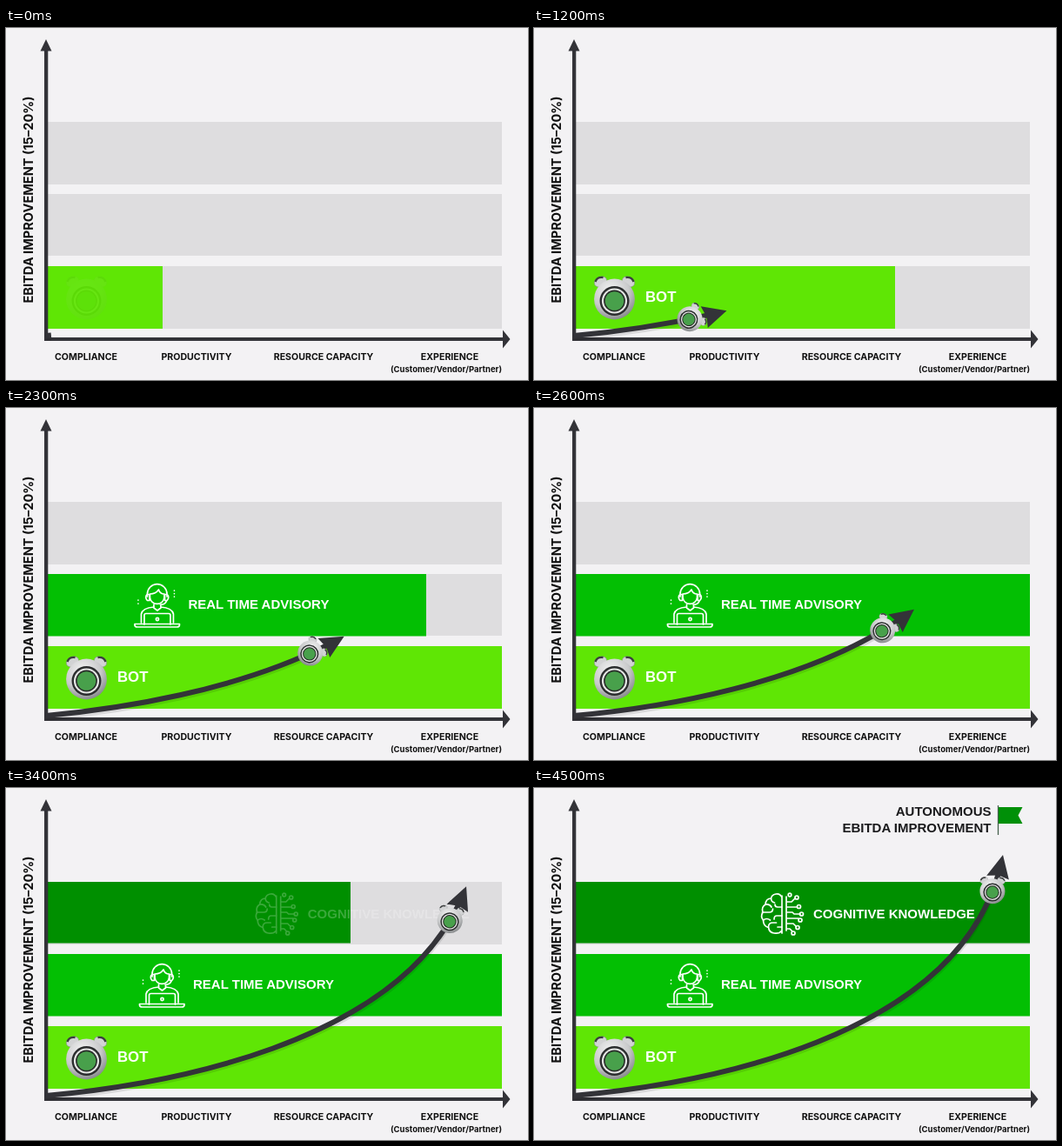
Animation, 600 px wide and 405 px high, one loop 8 s. Source, as an HTML page:

```html
<!DOCTYPE html>
<html lang="en">
<head>
<meta charset="utf-8">
<title>EBITDA improvement chart</title>
<style>
  html, body { margin: 0; width: 100%; height: 100%; overflow: hidden; background: #f3f2f4; }
  svg { display: block; width: 100%; height: 100%; }
  .axis { font: 700 10.6px Inter, "Open Sans", sans-serif; fill: #111; text-anchor: middle; }
  .label { font: 700 15px "Liberation Sans", Arial, sans-serif; fill: #fff; }
  .line { fill: none; stroke: #fff; stroke-width: 1.7; stroke-linecap: round; stroke-linejoin: round; }
</style>
</head>
<body>
<svg viewBox="0 0 600 405">
  <defs>
    <radialGradient id="shell" cx=".4" cy=".3" r=".75">
      <stop offset="0" stop-color="#f4f4f4"/>
      <stop offset=".6" stop-color="#c9cacb"/>
      <stop offset="1" stop-color="#808385"/>
    </radialGradient>
    <g id="bot">
      <g fill="#d2d3d4" stroke="#8d9092" stroke-width=".6">
        <ellipse cx="-16" cy="-20" rx="7.5" ry="5.5" transform="rotate(-28 -16 -20)"/>
        <ellipse cx="16" cy="-20" rx="7.5" ry="5.5" transform="rotate(28 16 -20)"/>
      </g>
      <path d="M-22 -20q2 -6 9 -5M22 -20q-2 -6 -9 -5" fill="none" stroke="#3b3d3e" stroke-width="2.4"/>
      <circle r="23.4" fill="url(#shell)"/>
      <circle cy="2" r="17" fill="#2b2d2e"/>
      <circle cy="2" r="14.6" fill="#e4e6e4"/>
      <circle cy="2" r="12.4" fill="#262a27"/>
      <circle cy="2" r="10.8" fill="#48a04b"/>
    </g>
  </defs>

  <rect width="600" height="405" fill="#f3f2f4"/>
  <path d="M48 108H570V180H48zM48 191H570V262H48zM48 274H570V346H48z" fill="#dedddf"/>
  <rect id="bar1" x="48" y="274" height="72" fill="#5fe605"/>
  <rect id="bar2" x="48" y="191" height="71.5" fill="#03bf03"/>
  <rect id="bar3" x="48" y="108" height="70.5" fill="#008f00"/>

  <text id="botText" class="label" x="128" y="315" style="font-size:16.8px">BOT</text>
  <use id="bigBot" href="#bot" x="92.5" y="312"/>

  <g id="advisory">
    <g class="line">
      <path d="M168 217v-3a11.300 11.300 0 0 1 22.600 0v3"/>
      <path d="M171 214c5 0 8-2 10-5 1 3 3 5 6.500 5v4a8.300 8.300 0 0 1-16.500 0z"/>
      <path d="M168 214.500q-3.500 3 0 7h2.500v-7zM190.600 214.500q3.500 3 0 7h-2.500v-7z"/>
      <path d="M190 222q-1 4-7 4.500M175.500 226v4l4 3 4-3v-4"/>
      <path d="M175.500 229q-13 1-14.500 8v10M183.500 229q13 1 14.500 8v10"/>
      <path d="M164.500 249v-10.500q0-2 2-2h26q2 0 2 2v10.500"/>
      <path d="M153.500 248.500h51.500v1q0 2.500-3 2.500h-45.500q-3 0-3-2.500z"/>
      <circle cx="179.500" cy="243" r="1.600"/>
      <path d="M157.500 221v.1M157.500 225v.1M199 210v.1M199 213.500v.1M199 217v.1"/>
    </g>
    <text class="label" x="215" y="231">REAL TIME ADVISORY</text>
  </g>

  <g id="cognitive">
    <g class="line" stroke-width="1.500">
      <path d="M285 124v43M285 126q-2-5-7-4-5 1-5.500 5-6 0-6.500 7-5 3-3 9-3 5 .5 9 0 7 6 8.500 1 6 6.500 6.500 6 1 9-3"/>
      <path d="M272.500 127q0 4 4 5M266 134q5-1 7 3M262.500 143h8q4 0 4-4M263.500 152q4-3 8 0M269.500 160q0-5 5-5h4M285 137h-5q-3 0-3-3M285 147h-6q-3 0-3 4M285 160h-5"/>
      <path d="M290 125v39M290 131h6l4-4M290 137h12M290 143h7l2 2h7M290 150h14M290 156h8l3 3M290 162h4l3 3"/>
      <circle cx="302" cy="126" r="2"/><circle cx="304.500" cy="136.500" r="2"/>
      <circle cx="307.500" cy="145" r="2"/><circle cx="306" cy="152" r="2"/>
      <circle cx="303" cy="160.500" r="2"/><circle cx="298" cy="167" r="2"/>
      <circle cx="294" cy="123" r="1.800"/>
    </g>
    <text class="label" x="321" y="150">COGNITIVE KNOWLEDGE</text>
  </g>

  <g fill="#333338">
    <path d="M44 25H48.300V356H571V347.500L579.500 358L571 368.500V360H44z"/>
    <path d="M39.500 26.500L46 13L52.500 26.500z"/>
  </g>

  <path id="shade" d="M46 356.500C200 342.500 500 287.500 539 79.500" fill="none" stroke="#000" stroke-opacity=".1" stroke-width="7"/>
  <path id="curve" d="M46 354C200 340 500 285 539 77" fill="none" stroke="#333338" stroke-width="6"/>
  <g id="arrow">
    <path id="head" d="M0 0L-28 -11.500L-24 2L-25.500 14.500z" fill="#333338"/>
    <use id="smallBot" href="#bot" transform="translate(-43.500 0) rotate(75) scale(.62)"/>
  </g>

  <g id="flag">
    <path d="M533.500 20V54" stroke="#47604d" stroke-width="1.300"/>
    <path d="M534 22H561.500L556.500 31.500L561.500 41H534z" fill="#009008"/>
  </g>
  <g id="goal" class="label" text-anchor="end" style="fill:#1b1b1d">
    <text x="525.500" y="32">AUTONOMOUS</text>
    <text x="525.500" y="51">EBITDA IMPROVEMENT</text>
  </g>

  <g class="axis">
    <text x="92" y="382">COMPLIANCE</text>
    <text x="219" y="382">PRODUCTIVITY</text>
    <text x="365" y="382">RESOURCE CAPACITY</text>
    <text x="510" y="382">EXPERIENCE</text>
    <text x="506" y="396" style="font-size:9.500px">(Customer/Vendor/Partner)</text>
    <text transform="translate(30.500 197.500) rotate(-90)" style="font-size:14.600px">EBITDA IMPROVEMENT (15–20%)</text>
  </g>
</svg>
<script>
const LOOP = 8000, STEP = 100;
const $ = id => document.getElementById(id);
const set = (id, name, value) => $(id).setAttribute(name, value);
const ramp = (t, from, to) => Math.min(1, Math.max(0, (t - from) / (to - from)));
const easeOut = u => 1 - (1 - u) ** 2;

// Linear interpolation through [time, value] pairs
function track(t, keys) {
  const i = keys.findIndex(k => k[0] > t);
  if (i < 0) return keys[keys.length - 1][1];
  if (i === 0) return keys[0][1];
  const [t0, a] = keys[i - 1], [t1, b] = keys[i];
  return a + (b - a) * (t - t0) / (t1 - t0);
}

const curve = $('curve');
const total = curve.getTotalLength();
const BAR1 = [[0, 180], [500, 257], [1200, 415], [1800, 546], [1900, 570]];
const TIP = [[0, 28], [500, 91], [1200, 178], [2300, 357], [3000, 491], [3600, total]];

function slideIn(id, u, offset) {
  set(id, 'transform', `translate(${offset * (1 - easeOut(u))} 0)`);
  set(id, 'opacity', Math.min(1, u * 1.6));
}

function drawArrow(t) {
  const s = track(t, TIP);
  const tip = curve.getPointAtLength(s);
  const mid = Math.max(1, s - 22);
  const a = curve.getPointAtLength(mid - 1), b = curve.getPointAtLength(mid + 1);
  const angle = Math.atan2(b.y - a.y, b.x - a.x) * 180 / Math.PI;
  const dash = `${Math.max(5, s - 22)} 999`;
  set('curve', 'stroke-dasharray', dash);
  set('shade', 'stroke-dasharray', dash);
  set('arrow', 'transform', `translate(${tip.x} ${tip.y}) rotate(${angle})`);
  set('head', 'opacity', ramp(t, 0, 300));
  set('smallBot', 'opacity', track(t, [[0, 0], [500, 0.85], [700, 1]]));
}

function draw(t) {
  set('bar1', 'width', track(t, BAR1) - 48);
  set('bar2', 'width', 522 * ramp(t, 1800, 2400));
  set('bar3', 'width', 522 * ramp(t, 3000, 3600));

  set('bigBot', 'opacity', track(t, [[0, 0.06], [500, 0.75], [1000, 1]]));
  const u = ramp(t, 200, 900);
  set('botText', 'opacity', Math.min(1, u * 1.3));
  set('botText', 'transform', `translate(${-28 * (1 - u)} 0)`);
  slideIn('advisory', ramp(t, 1900, 2500), -50);
  slideIn('cognitive', ramp(t, 3300, 4000), 35);

  drawArrow(t);

  const f = ramp(t, 3600, 4000), k = 1 - f;
  set('flag', 'opacity', Math.min(1, f * 1.3));
  set('flag', 'transform',
    `translate(${533 - 5 * k} ${37 + 33 * k}) scale(${1 - 0.26 * k}) translate(-533 -37)`);
  set('goal', 'opacity', ramp(t, 4100, 4500));
}

const start = performance.now();
function tick() {
  const t = (performance.now() - start) % LOOP;
  draw(Math.floor(t / STEP) * STEP);
  requestAnimationFrame(tick);
}
tick();
</script>
</body>
</html>
```
